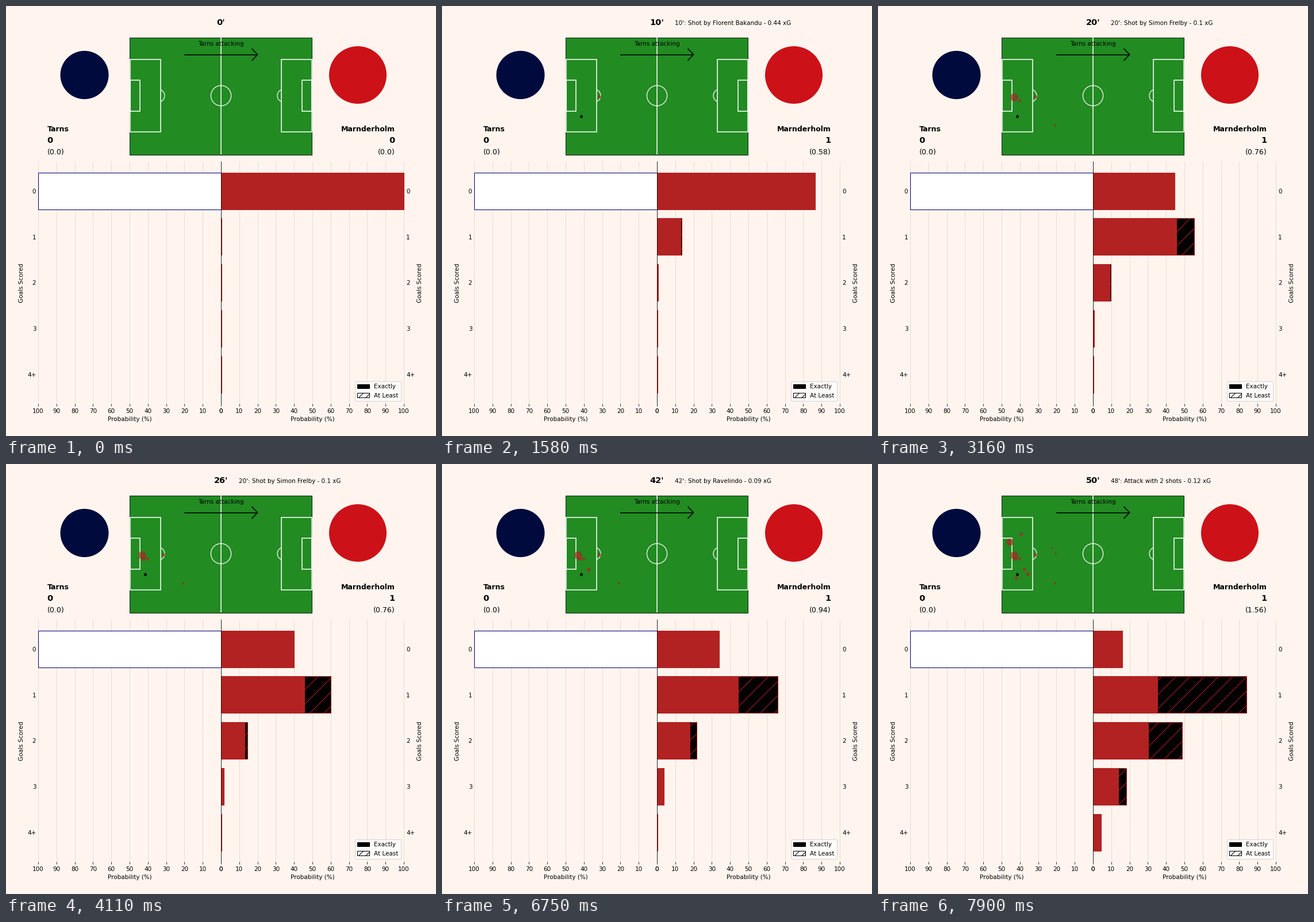
A matplotlib script for the animation above (8000 ms loop, 748 by 748 pixels).

```python
import numpy as np
import matplotlib.pyplot as plt
from matplotlib.animation import FuncAnimation
from matplotlib.collections import LineCollection
from matplotlib.patches import Arc, Circle, Patch, Rectangle

SIZE = 748
MID, SPAN = 374, 318          # centre line and length of a 100 % bar
TOP, BOTTOM = 270, 692
ROWS = 321.6 + 79.8 * np.arange(5)
BAR_H = 64
RED, NAVY, GRASS, PAPER = "firebrick", "navy", "forestgreen", "#fff5ee"
HOME, AWAY = "Tarns", "Marnderholm"

# minute: (description, probability of a goal, [(x, y, xg), ...])
EVENTS = {
    4: ("Goal scored by Ravelindo", 0.07, [(242, 191.5, 0.07)]),
    6: ("Shot by Florent Bakandu", 0.07, [(274, 158, 0.07)]),
    10: ("Shot by Florent Bakandu", 0.44, [(237, 159, 0.44)]),
    17: ("Attack with 2 shots", 0.08, [(246.5, 165, 0.06), (308, 207.5, 0.03)]),
    20: ("Shot by Simon Frelby", 0.1015, [(239, 164.5, 0.1)]),
    27: ("Shot by Julian Corvantel", 0.094, [(255, 184, 0.09)]),
    42: ("Shot by Ravelindo", 0.0865, [(261, 191.5, 0.09)]),
    44: ("Shot by Florent Bakandu", 0.34, [(229.5, 136, 0.36)]),
    46: ("Attack with 2 shots", 0.16, [(249, 122, 0.08), (302.5, 146, 0.02)]),
    48: ("Attack with 2 shots", 0.12, [(241, 198.5, 0.08), (309, 156, 0.02)]),
}
GOAL_MINUTE = 4
LAST_MINUTE, HOLD, STEP, STEPS = 50, 160, 30, 5
LOOP, INTERVAL = 8000, 20


def goal_odds(probs):
    """Chance in percent of scoring exactly 0, 1, 2, 3 and at least 4 goals."""
    dist = np.array([1.0])
    for p in probs:
        dist = np.convolve(dist, [1 - p, p])
    dist = np.pad(dist, (0, 5))
    return 100 * np.append(dist[:4], dist[4:].sum())


def chances(minute):
    return [p for m, (_, p, _) in EVENTS.items() if m <= minute]


def build_timeline():
    starts, states, t = [], [], 0
    for minute in range(LAST_MINUTE + 1):
        if minute in EVENTS:
            parts = [(STEP, k / (STEPS - 1)) for k in range(STEPS)]
        else:
            parts = [(HOLD, 1)]
        for length, mix in parts:
            starts.append(t)
            states.append((minute, mix))
            t += length
    return starts, states


STARTS, STATES = build_timeline()
ODDS = [goal_odds(chances(m)) for m in range(-1, LAST_MINUTE + 1)]

fig = plt.figure(figsize=(10, 10), dpi=SIZE / 10, facecolor=PAPER)
ax = fig.add_axes([0, 0, 1, 1])
ax.set(xlim=(0, SIZE), ylim=(SIZE, 0))
ax.axis("off")


def text(x, y, s="", size=10, ha="center", **kw):
    return ax.text(x, y, s, fontsize=size, ha=ha, family="DejaVu Sans", **kw)


def box(x, y, w, h, **kw):
    return ax.add_patch(Rectangle((x, y), w, h, **kw))


def lines(segments, color, lw, z):
    ax.add_collection(LineCollection(segments, colors=color, linewidths=lw, zorder=z),
                      autolim=False)


def draw_pitch():
    box(215.5, 54.5, 317, 204, fc=GRASS, ec="black", lw=0.8, zorder=1)
    white = dict(fc="none", ec="white", lw=1.5, zorder=2)
    lines([[(MID, 54.5), (MID, 258)]], "white", 1.5, 2)
    for x, w in ((216, 53.5), (216, 16.7), (478.7, 53.5), (515.5, 16.7)):
        y, h = (93, 126) if w > 20 else (129, 53.5)
        box(x, y, w, h, **white)
    ax.add_patch(Circle((MID, 156), 17.6, fc="none", ec="white", lw=1.2, zorder=2))
    for x, turn in ((265, 0), (483, 180)):
        ax.add_patch(Arc((x, 156), 22, 22, theta1=turn - 66, theta2=turn + 66,
                         ec="white", lw=1.2, zorder=2))
    text(373.5, 69, f"{HOME} attacking", zorder=4)
    lines([[(310, 84.5), (437.5, 84.5)],
           [(427.5, 74), (437.5, 84.5), (427.5, 95)]], "black", 1.5, 4)


def draw_axes():
    xs = MID + SPAN / 10 * np.arange(-10, 11)
    lines([[(x, TOP), (x, BOTTOM)] for x in xs], "#dfd9d1", 0.8, 1)
    lines([[(x, BOTTOM), (x, BOTTOM + 3.6)] for x in xs], "black", 0.8, 1)
    lines([[(MID, TOP), (MID, BOTTOM)]], "black", 0.8, 6)
    for side in (-1, 1):
        for n in range(0, 101, 10):
            text(MID + side * SPAN * n / 100, 708, str(n))
        text(MID + side * SPAN / 2, 722, "Probability (%)")
    for y, label in zip(ROWS, ("0", "1", "2", "3", "4+")):
        text(52.3, y + 4.2, label, ha="right")
        text(696, y + 4.2, label, ha="left")
    for x in (32.5, 725.5):
        text(x, 481.5, "Goals Scored", ha="right", va="center", rotation=90)
    keys = [Patch(fc="black", ec="black", label="Exactly"),
            Patch(fc="white", ec="black", hatch="//", label="At Least")]
    ax.legend(handles=keys, loc="lower right", bbox_to_anchor=(692, BOTTOM),
              bbox_transform=ax.transData, fontsize=10).set_zorder(7)


def draw_teams():
    ax.add_patch(Circle((136.5, 120), 42, fc="#000a3c", lw=0))
    ax.add_patch(Circle((612, 120), 50, fc="#cc1119", lw=0))
    text(71.5, 217.5, HOME, 12, "left", weight="bold")
    text(71.5, 238, "0", 14, "left", weight="bold")
    text(71.5, 258, "(0.0)", 12, "left")
    text(676.3, 217.5, AWAY, 12, "right", weight="bold")


draw_pitch()
draw_axes()
draw_teams()

clock = text(MID, 33, size=14, weight="bold")
news = text(405, 33, ha="left")
score = text(676.3, 238, size=14, ha="right", weight="bold")
total = text(676.3, 258, size=12, ha="right")

box(MID - SPAN, ROWS[0] - BAR_H / 2, SPAN, BAR_H, fc="white", ec=NAVY, lw=1, zorder=3)
at_least = [box(MID, y - BAR_H / 2, 0, BAR_H, fc="black", ec=RED, hatch="/", lw=1, zorder=4)
            for y in ROWS[1:]]
exactly = [box(MID, y - BAR_H / 2, 0, BAR_H, fc=RED, ec=RED, lw=1, zorder=5)
           for y in ROWS]

marks = []
for minute, (_, _, shots) in EVENTS.items():
    for x, y, xg in shots:
        if minute == GOAL_MINUTE:
            mark, = ax.plot(x, y, "*", color="black", ms=5, zorder=3)
        else:
            mark = ax.add_patch(Circle((x, y), 9.8 * xg ** 0.5, fc=RED, ec=RED,
                                       lw=0.5, alpha=0.65, zorder=3))
        marks.append((minute, mark))


def bar_length(percent):
    return max(percent / 100 * SPAN, 1)


def update(i):
    t = i * INTERVAL + INTERVAL / 2
    minute, mix = STATES[np.searchsorted(STARTS, t, side="right") - 1]

    clock.set_text(f"{minute}'")
    past = [m for m in EVENTS if m <= minute]
    if past:
        what, p, _ = EVENTS[past[-1]]
        news.set_text(f"{past[-1]}': {what} - {round(p, 2)} xG")
    else:
        news.set_text("")
    score.set_text(str(int(minute >= GOAL_MINUTE)))
    total.set_text(f"({round(float(sum(chances(minute))), 2)})")

    odds = (1 - mix) * ODDS[minute] + mix * ODDS[minute + 1]
    tails = odds[::-1].cumsum()[::-1]
    for bar, v in zip(exactly, odds):
        bar.set_width(bar_length(v))
    for bar, v in zip(at_least, tails[1:]):
        bar.set_width(bar_length(v))
    for m, mark in marks:
        mark.set_visible(m < minute)
    return []


anim = FuncAnimation(fig, update, frames=LOOP // INTERVAL, interval=INTERVAL,
                     init_func=lambda: update(0), repeat=True, repeat_delay=0,
                     blit=False)
plt.show()
```
